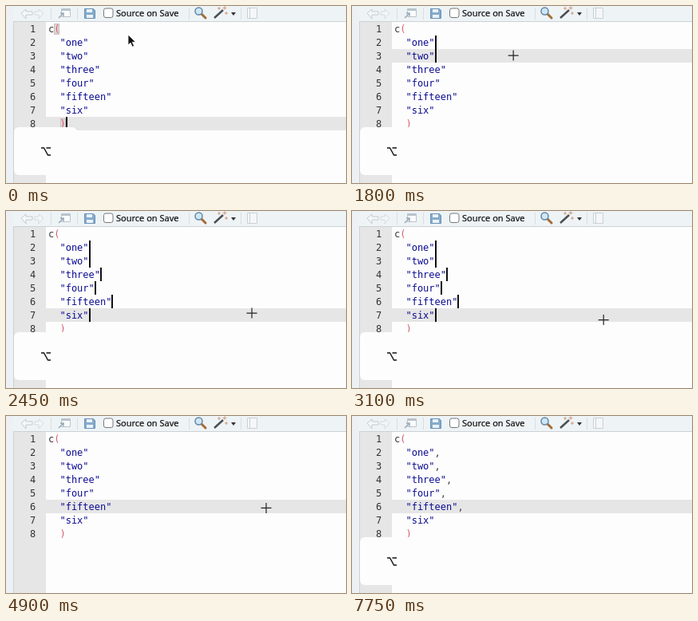
Write an HTML page that moves like this. It is 426x222 px and loops after 7800 ms.

```html
<!DOCTYPE html>
<html lang="en">
<head>
<meta charset="utf-8">
<title>Multiple cursors in a code editor</title>
<style>
html, body { margin: 0; width: 100%; height: 100%; overflow: hidden; background: #fdfdfd; }
svg { display: block; width: 426px; height: 222px; }
.code text { font: 12px "DejaVu Sans Mono", monospace; white-space: pre; }
.label { font: 500 11px "Noto Sans", sans-serif; fill: #111; stroke: #111; stroke-width: .2px; }
</style>
</head>
<body>
<svg viewBox="0 0 426 222">
  <rect width="426" height="222" fill="#fdfdfd"/>
  <rect x="10" y="20" width="40" height="202" fill="#e6e6e6"/>
  <rect id="active" x="50" width="376" height="17" fill="#e6e6e6"/>
  <g id="match" fill="#dfd5d5" stroke="#c9c0c0">
    <rect x="60.5" y="22.5" width="6" height="13"/>
    <rect x="68.5" y="141.5" width="6" height="13"/>
  </g>
  <g id="code" class="code"></g>
  <g id="carets" fill="#111"></g>

  <rect width="426" height="20" fill="#eef3f6"/>
  <rect width="9" height="222" fill="#eef1f4"/>
  <path d="M9.5 20V222M9 19.5H426" stroke="#cbd1d5"/>
  <g fill="none" stroke="#c3cacf">
    <path d="M19 9l6-5v3h8v4h-8v5z" fill="#f6f8f9"/>
    <path d="M47 9l-6-5v3h-5v4h5v5z" fill="#f6f8f9" opacity=".6"/>
    <path d="M56.5 2V17M89.5 2V17M229.5 2V17M294.5 2V17" stroke="#d9dee2"/>
    <path d="M69.5 3.500h11v10h-11z" fill="#fafbfc" stroke="#b9c4cc"/>
    <path d="M70 5h10" stroke="#b9c4cc" stroke-width="2"/>
    <path d="M66 15l6-6m-4 0h4v4" stroke="#9aabb8" stroke-width="1.500"/>
    <path d="M302.500 2.500h12v13h-12zM305.500 3v12" fill="#f4f6f8" stroke="#cbd0d4"/>
  </g>
  <path d="M98.500 3.500h11l2 2v10h-13z" fill="#86abcc" stroke="#6990b4"/>
  <path d="M101 4h7v4h-7zM101 11h8v4h-8z" fill="#eaf2f8"/>
  <rect x="122.500" y="3" width="11.500" height="11.500" rx="2.500" fill="#fff" stroke="#777"/>
  <text class="label" x="138" y="13">Source on Save</text>
  <path d="M245 10l5 5" stroke="#a56d37" stroke-width="3" stroke-linecap="round"/>
  <circle cx="241.500" cy="6.500" r="4.500" fill="#cfe6f5" stroke="#6286a3" stroke-width="1.500"/>
  <path d="M261 15L272 5" stroke="#494f55" stroke-width="2.500"/>
  <path d="M267 1v4M265 3h4M274 0v5M271.500 2.500h5M276 7v4M274 9h4" stroke="#d49a7a"/>
  <path d="M282 8h6l-3 4z" fill="#333"/>

  <g id="keys">
    <rect x="10" y="152" width="79" height="60" rx="6" fill="#fdfdfd"/>
    <path d="M44 178h3.500l5 9H56M50.500 178H56" fill="none" stroke="#111" stroke-width="1.400"/>
  </g>
  <path id="arrow" d="M0 0V13l3-2.800 2.300 5 2.300-1-2.300-4.900H9.500z" fill="#111" stroke="#fff" stroke-width=".8"/>
  <path id="cross" d="M-6.500 0h13M0-6.500v13" stroke="#222" stroke-width="1.200"/>
</svg>
<script>
const LOOP = 7800, ROW = 17, CHAR = 7.22, LEFT = 53, TYPED = 5500;
const words = ["one", "two", "three", "four", "fifteen", "six"];
const $ = id => document.getElementById(id);
const rowTop = line => 20 + ROW * (line - 1);
const clamp = v => Math.max(0, Math.min(1, v));

// Pointer waypoints: time, x, y
const arrowPath = [[0, 153, 36], [800, 146, 43]];
const crossPath = [[1100, 146, 44], [1500, 171, 50], [1800, 202, 62], [2450, 308, 128],
  [2650, 313, 142], [2900, 314, 141], [3400, 317, 130], [3700, 317, 130],
  [4100, 322, 123.5], [4400, 326, 116], [5300, 326, 115]];
// Spans in which the carets are lit
const lit = [[-200, 350], [850, 3750], [4200, 4800], [5300, 6070], [6600, 7150]];

function add(parent, tag, attrs, text = "") {
  const el = document.createElementNS("http://www.w3.org/2000/svg", tag);
  for (const name in attrs) el.setAttribute(name, attrs[name]);
  el.textContent = text;
  return $(parent).appendChild(el);
}

function write(line, x, text, fill) {
  return add("code", "text", { x, y: rowTop(line) + 13, fill }, text);
}

function along(path, t) {
  const i = path.findIndex(p => p[0] > t);
  if (i < 1) return path[i ? path.length - 1 : 0].slice(1);
  const [a, b] = [path[i - 1], path[i]];
  const k = (t - a[0]) / (b[0] - a[0]);
  return [a[1] + (b[1] - a[1]) * k, a[2] + (b[2] - a[2]) * k];
}

for (let line = 1; line <= 8; line++) write(line, 30, line, "#333");
write(1, LEFT, "c", "#333");
write(1, LEFT + CHAR, "(", "#d4606c");
write(8, LEFT + 2 * CHAR, ")", "#d4606c");
const ends = words.map(word => LEFT + (word.length + 4) * CHAR);
words.forEach((word, i) => write(i + 2, LEFT + 2 * CHAR, `"${word}"`, "#0b0b92"));
const commas = ends.slice(0, 5).map((x, i) => write(i + 2, x, ",", "#444"));
ends.push(LEFT + 3 * CHAR);
const carets = ends.map((x, i) =>
  add("carets", "rect", { y: rowTop(i + 2), width: 2, height: ROW }));

const show = (el, on) => el.setAttribute("opacity", +on);
const move = (el, [x, y]) => el.setAttribute("transform", `translate(${x} ${y})`);

function draw(t) {
  const crossAt = along(crossPath, t);
  const dragging = t >= 1150;
  const line = dragging ? 1 + Math.floor((crossAt[1] - 20) / ROW) : 8;
  const typed = t >= TYPED;

  $("active").setAttribute("y", rowTop(line));
  show($("match"), !dragging);
  move($("arrow"), along(arrowPath, t));
  show($("arrow"), t < 1100);
  move($("cross"), crossAt);
  show($("cross"), t >= 1100 && !typed);
  show($("keys"), t < 4850 ? clamp((4850 - t) / 200) : clamp((t - 7150) / 200));

  commas.forEach(el => show(el, typed));
  carets.forEach((el, i) => {
    el.setAttribute("x", Math.round(ends[i] + (typed ? CHAR : 0)));
    show(el, dragging ? i + 2 <= line : i === 6);
  });
  const glow = lit.map(([from, to]) => Math.min(clamp((t - from + 40) / 60), clamp((to + 20 - t) / 60)));
  show($("carets"), Math.max(...glow));
}

function tick() {
  draw(performance.now() % LOOP);
  requestAnimationFrame(tick);
}
tick();
</script>
</body>
</html>
```
